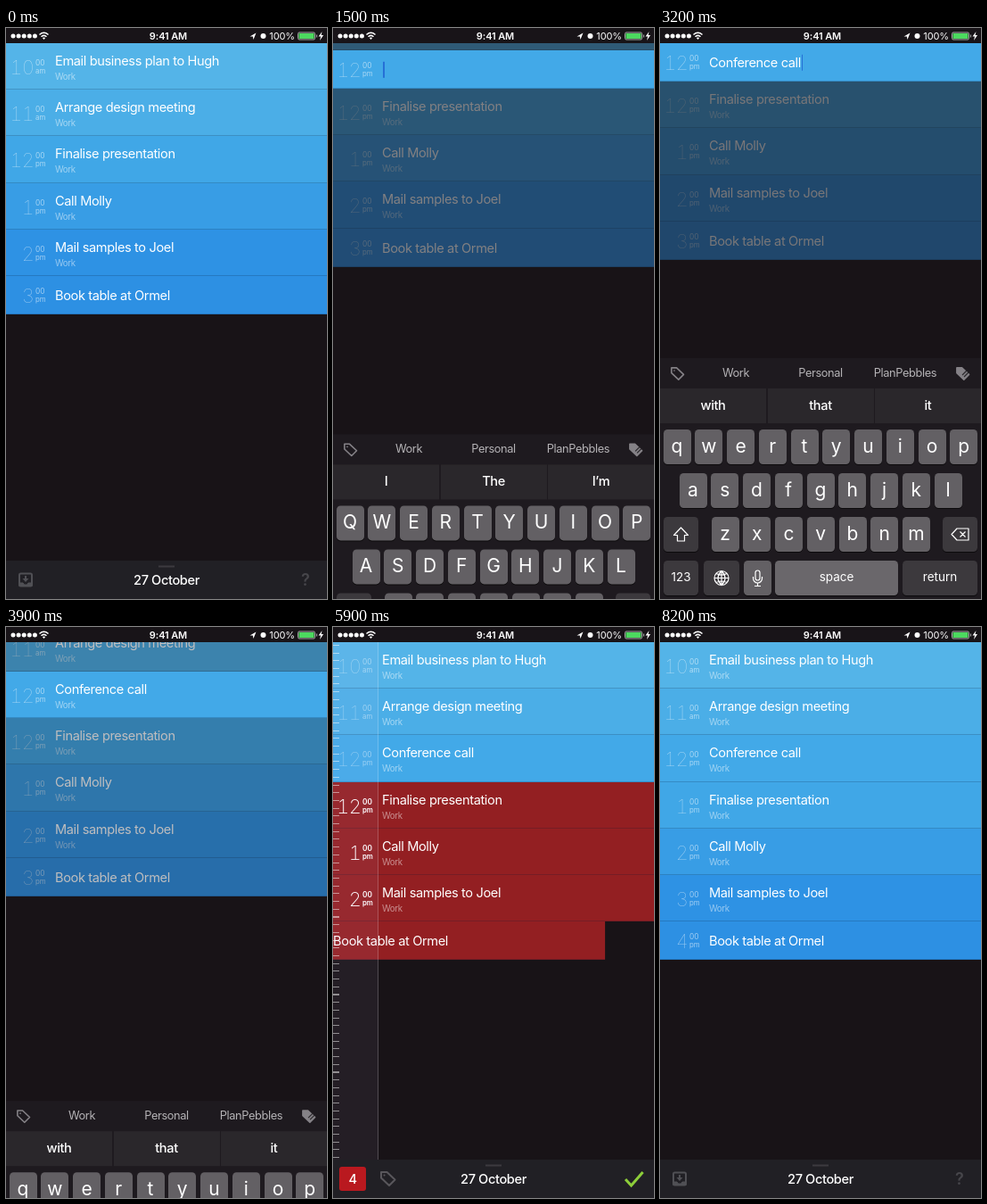
These frames come from a looping animation (360x640 px, 8400 ms). An HTML page:

```html
<!DOCTYPE html>
<html lang="en">
<head>
<meta charset="utf-8">
<title>Day planner</title>
<style>
html, body { margin: 0; width: 100%; height: 100%; overflow: hidden; background: #181317; }
#stage { position: absolute; left: 0; top: 0; width: 360px; height: 640px; overflow: hidden; background: #181317; color: #fff;
  font: 14.6px/20px Inter, Roboto, sans-serif; letter-spacing: -.026em; }
#stage div, #stage svg, #stage b { position: absolute; white-space: nowrap; }
svg { left: 0; top: 0; fill: none; overflow: visible; }
b { font-weight: 400; }

#list { left: 0; top: 0; }
.row { left: 0; top: 0; width: 360px; overflow: hidden; }
.face { left: 0; top: 0; width: 360px; transform-origin: 0 0; }
.face::after { content: ""; position: absolute; left: 0; right: 0; bottom: 0; height: 1px; background: rgba(0,20,50,.2); }
#stage .title { left: 55px; top: -10px; white-space: pre; }
.tag { left: 55px; top: 28px; font-size: 9.8px; color: rgba(255,255,255,.5); }
.time { left: 0; top: 0; }
.hour { right: -31px; top: -10px; font-size: 22px; font-weight: 100; letter-spacing: -.04em; font-variant-numeric: tabular-nums; }
.min, .half { left: 33px; font-size: 8.3px; letter-spacing: 0; }
.min { top: -14.6px; }
.half { top: -5.8px; font-size: 7.8px; }
.veil { inset: 0; background: #181317; }
.caret { display: inline-block; width: 1.5px; height: 18px; margin-left: 1px; background: #2670d6; vertical-align: -4px; }

#ruler { left: 0; top: 17px; width: 50px; height: 580px; border-right: 1px solid rgba(255,255,255,.2); background: rgba(215,205,255,.06); }
#ruler::before { content: ""; position: absolute; left: 0; top: 3px; width: 7px; height: 577px;
  background: repeating-linear-gradient(rgba(255,255,255,.5) 0 1px, transparent 1px 8.7px); }
#status { left: 0; top: 0; width: 360px; height: 17px; background: #181418; font-size: 11px; letter-spacing: -.01em; }
#bar { left: 0; top: 597px; width: 360px; height: 43px; background: #212025; }
#bar .name { left: 0; width: 360px; top: 12px; text-align: center; font-weight: 500; }
.layer { left: 0; top: 0; }
#count { left: 7px; top: 8px; width: 30px; height: 27px; border-radius: 3px; background: #b9191f; text-align: center; line-height: 28px; font-weight: 500; }

#board { left: 0; top: 370px; width: 360px; height: 270px; background: #1e1a1f; }
#board > .label { top: 7px; width: 110px; text-align: center; font-size: 12.8px; color: #b5b3b6; }
.word { top: 34px; width: 119px; height: 39px; background: #2a272b; text-align: center; line-height: 38px; font-weight: 500; }
.key { height: 39px; border-radius: 4.5px; background: #636064; box-shadow: 0 1px 0 #0c0a0c; text-align: center; line-height: 37px; letter-spacing: 0; }
.letter { width: 31px; font-size: 21px; }
.dark { background: #3c393d; }
#pop { width: 54px; }
#pop b { left: 0; width: 54px; top: 14px; text-align: center; font-size: 31px; letter-spacing: 0; }
</style>
</head>
<body>
<div id="stage">
  <div id="list"></div>
  <div id="ruler"></div>
  <div id="bar">
    <svg width="360" height="43"><path d="M171 6.500h18" stroke="#3c3a3f" stroke-width="2"/></svg>
    <div class="name"></div>
    <div class="layer" id="idle">
      <svg width="360" height="43" stroke="#505055" stroke-width="2">
        <rect x="15" y="14.500" width="14" height="14" rx="1.500"/>
        <path d="M15 25h4l1.500 2h3l1.500-2h4v3.500h-14z" fill="#505055" stroke-width="1"/>
        <path d="M22 17v4"/><path d="M18.500 20h7l-3.500 4z" fill="#505055" stroke="none"/>
      </svg>
      <b style="left:331px;top:12px;font-size:18px;font-weight:600;color:#47464b">?</b>
    </div>
    <div class="layer" id="tools">
      <div id="count"></div>
      <svg width="360" height="43"><g stroke="#59575c" stroke-width="2"><use href="#label" transform="translate(53 13)"/></g>
        <path d="M328 22l6.500 7L347.500 14" stroke="#8dce3a" stroke-width="3"/></svg>
    </div>
  </div>
  <div id="board">
    <svg width="360" height="270">
      <defs><path id="label" d="M1 1h6.500l9 8.500-6.500 6.500L1 7.500zM4.500 4.500h.1" stroke-linejoin="round" stroke-linecap="round"/></defs>
      <g stroke="#858287" stroke-width="1.800">
        <use href="#label" transform="translate(12 10) scale(.88)"/>
        <use href="#label" transform="translate(332 10) scale(.88)" fill="#858287"/>
        <path d="M339 19l5-5M341 21l5-5" stroke="#2a272b" stroke-width="1.200"/>
      </g>
    </svg>
    <div class="label" style="left:30px">Work</div>
    <div class="label" style="left:125px">Personal</div>
    <div class="label" style="left:220px">PlanPebbles</div>
  </div>
  <div id="status">
    <svg width="360" height="17">
      <path d="M8 9h25" stroke="#fff" stroke-width="5" stroke-linecap="round" stroke-dasharray="0 6.100"/>
      <g stroke="#fff" stroke-width="1.500"><path d="M37.500 7.500q5-4.500 10 0M39.500 9.700q3-2.700 6 0"/></g>
      <path d="M40.800 11l1.700 2 1.700-2q-1.700-1.200-3.400 0zM273.500 9.500l7-4-3 7.500-.7-3.500zM354.500 4l-4 5.500h2.500l-1 4.500 4-6h-2.500z" fill="#fff"/>
      <circle cx="288.500" cy="9" r="3" fill="#fff"/>
      <rect x="327.500" y="5" width="19" height="8" rx="1.500" stroke="#aaa"/>
      <rect x="328.500" y="6" width="17" height="6" fill="#4cd95f"/>
      <path d="M348.500 7.500v3" stroke="#aaa"/>
    </svg>
    <b style="left:132px;width:100px;top:-1px;text-align:center;font-weight:600">9:41 AM</b>
    <b style="right:36px;top:-1px">100%</b>
  </div>
</div>
<script>
const LOOP = 8400, STEP = 100, TALL = 52.2, SHORT = 43.2;
const RED = [147, 31, 34], TEXT = 'Conference call', TYPE_START = 1600;
const $ = id => document.getElementById(id);

function add(parent, cls, text = '', style = {}) {
  const el = document.createElement('div');
  el.className = cls;
  el.textContent = text;
  Object.assign(el.style, style);
  parent.append(el);
  return el;
}

// Smooth 0 to 1 between times a and b.
function ramp(t, a, b) {
  const u = Math.min(1, Math.max(0, (t - a) / (b - a)));
  return u * u * (3 - 2 * u);
}
const mix = (a, b, k) => a.map((v, i) => Math.round(v + (b[i] - v) * k));

// peak: time at which the row is swiped furthest left
const rows = [
  { title: 'Email business plan to Hugh', hour: 10, color: [84, 180, 232] },
  { title: 'Arrange design meeting', hour: 11, color: [75, 174, 231] },
  { title: '', hour: 12, color: [66, 169, 232], fresh: true },
  { title: 'Finalise presentation', hour: 12, color: [64, 167, 231], peak: 4700 },
  { title: 'Call Molly', hour: 13, color: [56, 157, 229], peak: 5100 },
  { title: 'Mail samples to Joel', hour: 14, color: [46, 146, 228], peak: 5400 },
  { title: 'Book table at Ormel', hour: 15, color: [45, 144, 227], peak: 5700, plain: true }
];
for (const r of rows) {
  r.el = add($('list'), 'row');
  r.face = add(r.el, 'face');
  r.name = add(r.face, 'title', r.title);
  r.tag = add(r.face, 'tag', 'Work');
  r.time = add(r.face, 'time');
  for (const part of ['hour', 'min', 'half']) r[part + 'El'] = add(r.time, part);
  r.veil = add(r.el, 'veil');
}

const words = [0, 1, 2].map(i => add($('board'), 'word', '', { left: i * 120.5 + 'px' }));
const keys = {};
[['qwertyuiop', 19, 80], ['asdfghjkl', 37, 129], ['zxcvbnm', 73, 178]].forEach(([chars, x0, y]) => {
  [...chars].forEach((c, i) => {
    const x = x0 + i * 35.75;
    keys[c] = { x, y, el: add($('board'), 'key letter', c, { left: x - 15.5 + 'px', top: y + 'px' }) };
  });
});
function special(x, y, w, text, dark) {
  return add($('board'), 'key' + (dark ? ' dark' : ''), text,
    { left: x + 'px', top: y + 'px', width: w + 'px', fontSize: '13.5px' });
}
function icon(key, w, path) {
  key.innerHTML = `<svg width="${w}" height="39" stroke="#fff" stroke-width="1.2" stroke-linejoin="round"><path d="${path}"/></svg>`;
}
icon(special(4, 178, 39, '', true), 39, 'M19.500 12l8 8.500h-4v6.500h-8v-6.500h-4z');
icon(special(317, 178, 39, '', true), 39, 'M10 19.500l6-6.500h13v13H16zM19.500 16.500l6 6m0-6l-6 6');
special(4, 227, 39, '123', true);
icon(special(49, 227, 40, '', true), 40, 'M28 19.500a8 8 0 1 1-16 0a8 8 0 1 1 16 0zM12 19.500h16M20 11.500v16M20 11.500q-8 8 0 16q8-8 0-16M14 14.500q6 3 12 0M14 24.500q6-3 12 0');
icon(special(94, 227, 31, '', false), 31, 'M13 13.500a2.500 2.500 0 0 1 5 0v6a2.500 2.500 0 0 1-5 0zM10.500 18v2a5 5 0 0 0 10 0v-2M15.500 25v3.500M12 28.500h7');
const space = special(129, 227, 138, 'space');
special(272, 227, 84, 'return', true);

const pop = add($('board'), '');
pop.id = 'pop';
pop.innerHTML = '<svg width="54" height="93"><path fill="#4b484c" d="M6 0h42q6 0 6 6v27q0 6-6 10t-5.500 10v35q0 5-5 5h-21q-5 0-5-5v-35q.5-6-5.500-10t-6-10v-27q0-6 6-6z"/></svg><b></b>';

function suggestions(t, n) {
  if (t >= 3200) return ['with', 'that', 'it'];
  const k = n - 2;
  if (k <= 0) return ['I', 'The', 'I’m'];
  if (k > 10) return [`“${TEXT.slice(11, Math.max(12, k))}”`, 'call', 'called'];
  const next = k < 3 ? ['Can', 'Could'] : k < 5 ? ['Conference', 'Confirm'] : ['Conference', 'Confessions'];
  return [`“${TEXT.slice(0, k)}”`, ...next];
}

function drawRows(t, n, delta) {
  const veil = .58 * (ramp(t, 1250, 1550) - ramp(t, 3740, 4052));
  const ruler = ramp(t, 4350, 4650) - ramp(t, 7250, 7550);
  let y = 17 - 104.4 * (ramp(t, 1250, 1550) - ramp(t, 3780, 4100));
  for (const r of rows) {
    const tagged = r.plain ? 0 : r.fresh ? ramp(t, 3250, 3450) : 1;
    const open = r.fresh ? ramp(t, 400, 1200) * (t >= 500) : 1;
    const full = SHORT + (TALL - SHORT) * tagged;
    // Whole-pixel edges keep neighbouring rows free of seams.
    const top = Math.round(y), height = Math.round(y + full * open) - top;
    let shift = 0, picked = 0;
    if (r.peak) {
      shift = -88 * (ramp(t, r.peak - 300, r.peak) - ramp(t, r.peak, r.peak + 480));
      picked = ramp(t, r.peak - 70, r.peak + 200) - ramp(t, 7250, 7700);
    }
    r.el.style.transform = `translateY(${top}px)`;
    r.el.style.height = height + 'px';
    r.face.style.height = (open < 1 ? full : height) + 'px';
    r.face.style.transform = `translateX(${shift}px) scaleY(${open})`;
    r.face.style.background = `rgb(${mix(r.color, RED, picked)})`;
    r.name.style.transform = `translateY(${21.8 - 1.8 * tagged}px)`;
    r.tag.style.opacity = tagged;
    r.time.style.transform = `translateY(${22 + 4.8 * tagged}px)`;
    r.time.style.opacity = .55 - .1 * ruler + .55 * picked;
    r.hourEl.style.fontWeight = picked > .5 ? 200 : 100;
    r.minEl.style.fontWeight = r.halfEl.style.fontWeight = picked > .5 ? 600 : 400;
    const mins = r.hour * 60 + (r.peak ? delta : 0);
    r.hourEl.textContent = (Math.floor(mins / 60) + 11) % 12 + 1;
    r.minEl.textContent = String(mins % 60).padStart(2, '0');
    r.halfEl.textContent = mins < 720 ? 'am' : 'pm';
    r.veil.style.opacity = r.fresh ? 0 : veil;
    if (r.fresh) {
      r.name.textContent = t < 1300 ? 'Pinch apart to insert' : TEXT.slice(0, n);
      if (t >= 1300 && t < 3700) {
        const caret = document.createElement('span');
        caret.className = 'caret';
        r.name.append(caret);
      }
    }
    y += full * open;
  }
  $('ruler').style.opacity = ruler;
}

function drawBar(t, delta) {
  const count = rows.filter(r => r.peak <= t).length;
  const tools = ramp(t, 4550, 4750) - ramp(t, 7250, 7500);
  $('tools').style.opacity = tools;
  $('idle').style.opacity = 1 - tools;
  $('count').textContent = count || '';
  const gain = delta < 60 ? `+${delta}m` : '+1h 00m';
  document.querySelector('#bar .name').textContent = delta && t < 7300 ? gain : '27 October';
}

function drawBoard(t, n) {
  const up = ramp(t, 1250, 1650) - ramp(t, 3700, 4054);
  $('board').style.transform = `translateY(${270 * (1 - up)}px)`;
  suggestions(t, n).forEach((s, i) => words[i].textContent = s);
  const next = t >= TYPE_START && n < TEXT.length ? TEXT[n] : '';
  const key = keys[next.toLowerCase()];
  for (const c in keys) keys[c].el.textContent = n ? c : c.toUpperCase();
  space.style.background = next === ' ' ? '#3c393d' : '#6a676b';
  pop.style.display = key ? 'block' : 'none';
  if (key) {
    pop.style.left = key.x - 27 + 'px';
    pop.style.top = key.y - 54 + 'px';
    pop.lastChild.textContent = next;
  }
}

function draw(now) {
  const t = Math.floor(now % LOOP / STEP) * STEP;
  const n = Math.min(TEXT.length, Math.max(0, (t - TYPE_START) / 100));
  const delta = Math.round(12 * ramp(t, 6100, 7000)) * 5;
  drawRows(t, n, delta);
  drawBar(t, delta);
  drawBoard(t, n);
}

const start = performance.now();
function tick() {
  draw(performance.now() - start);
  requestAnimationFrame(tick);
}
tick();
</script>
</body>
</html>
```
